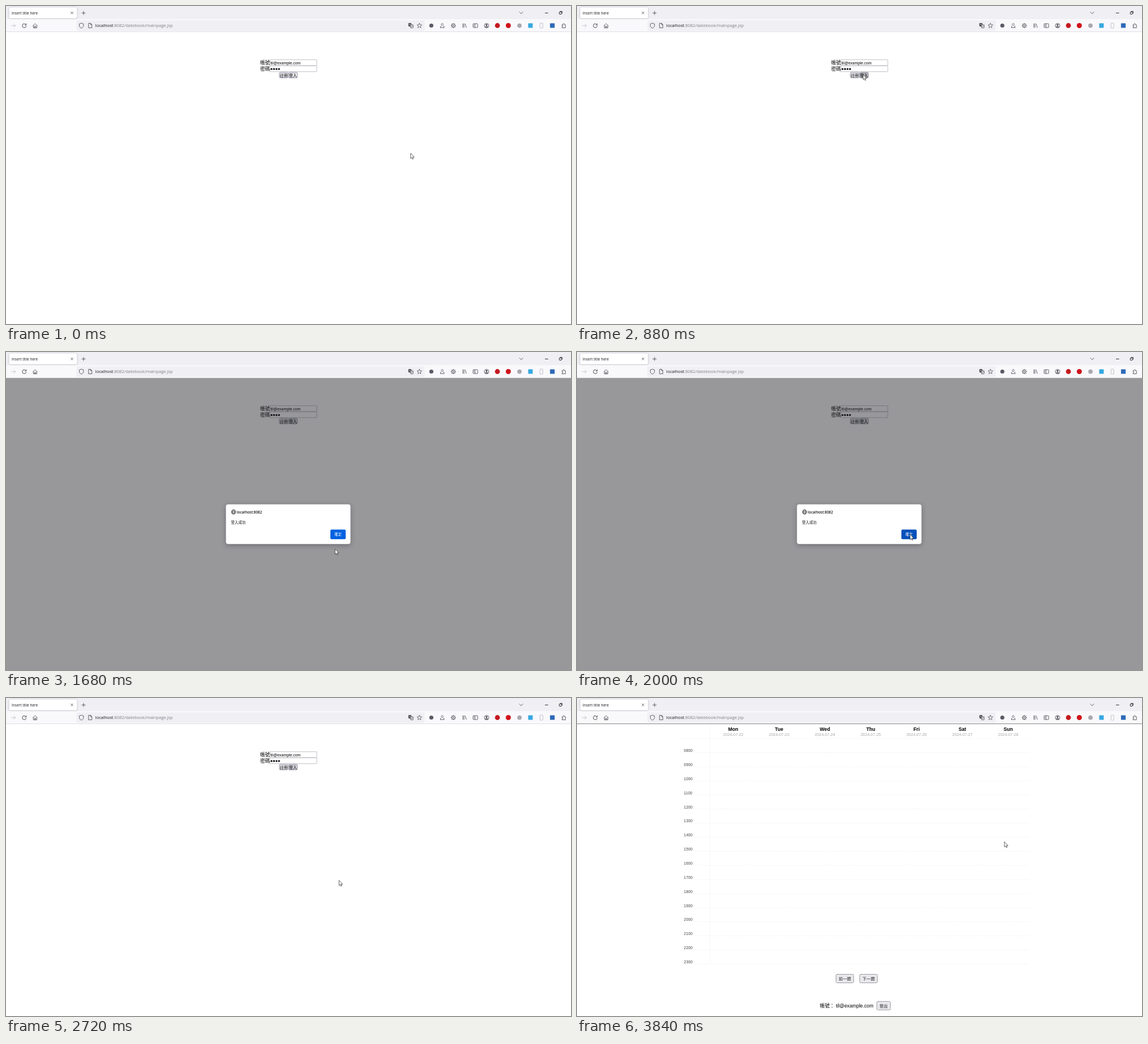
Write an HTML page with a canvas that moves like this. It is 998 px wide and 561 px high and loops after 3.92 s.

```html
<!DOCTYPE html>
<html lang="zh-Hant">
<head>
<meta charset="utf-8">
<title>Datebook</title>
<style>
html, body { margin: 0; width: 100%; height: 100%; overflow: hidden; background: #fff; }
canvas { display: block; }
</style>
</head>
<body>
<canvas id="stage" width="998" height="561"></canvas>
<script>
const ctx = document.getElementById('stage').getContext('2d');
const LOOP = 3920, STEP = 80;
const UI = '"Open Sans", "Noto Sans CJK TC", "Noto Sans CJK", sans-serif';
const ARIAL = '"Liberation Sans", "Noto Sans CJK TC", "Noto Sans CJK", sans-serif';
const CJK = '"Noto Sans CJK TC", "Noto Sans CJK", sans-serif';
const EMAIL = 'til@example.com';
const INK = '#3c3c44';

// Pointer track: time, x, y
const TRACK = [
  [80, 714.8, 259.8], [640, 505.6, 123.5], [720, 505.6, 123.5], [880, 505.3, 120.7],
  [1040, 505.3, 120.7], [1520, 470, 103], [1680, 581.3, 347.6],
  [2000, 588.3, 321.7], [3600, 588.3, 321.7], [3840, 754.9, 253.5]
];

function text(str, x, y, size, { font = ARIAL, color = '#000', align = 'left', weight = 400 } = {}) {
  ctx.font = `${weight} ${size}px ${font}`;
  ctx.fillStyle = color;
  ctx.textAlign = align;
  ctx.fillText(str, x, y);
}

function rect(x, y, w, h, fill) {
  ctx.fillStyle = fill;
  ctx.fillRect(x, y, w, h);
}

function box(x, y, w, h, r, fill, stroke, width = 0.7, dash = []) {
  ctx.beginPath();
  ctx.roundRect(x, y, w, h, r);
  if (fill) { ctx.fillStyle = fill; ctx.fill(); }
  if (stroke) outline(stroke, width, dash);
}

function outline(color, width = 0.8, dash = []) {
  ctx.strokeStyle = color;
  ctx.lineWidth = width;
  ctx.setLineDash(dash);
  ctx.stroke();
  ctx.setLineDash([]);
}

function line(points, color = INK, width = 0.8, dash = []) {
  ctx.beginPath();
  for (let i = 0; i < points.length; i += 2) ctx.lineTo(points[i], points[i + 1]);
  outline(color, width, dash);
}

function circle(x, y, r, fill, stroke, width = 0.8) {
  ctx.beginPath();
  ctx.arc(x, y, r, 0, Math.PI * 2);
  if (fill) { ctx.fillStyle = fill; ctx.fill(); }
  if (stroke) outline(stroke, width);
}

function shadow(color, blur, dy) {
  ctx.shadowColor = color;
  ctx.shadowBlur = blur;
  ctx.shadowOffsetY = dy;
}

function shape(d, x, y, color = INK, width = 0.8) {
  ctx.save();
  ctx.translate(x, y);
  ctx.strokeStyle = color;
  ctx.lineWidth = width;
  ctx.stroke(new Path2D(d));
  ctx.restore();
}

function star(x, y) {
  const pts = [];
  for (let i = 0; i <= 10; i++) {
    const a = -Math.PI / 2 + i * Math.PI / 5, r = i % 2 ? 2 : 4.5;
    pts.push(x + r * Math.cos(a), y + r * Math.sin(a));
  }
  line(pts, INK, 0.7);
}

function gear(x, y) {
  circle(x, y, 3.1, null, INK);
  circle(x, y, 1.2, null, INK, 0.7);
  for (let i = 0; i < 8; i++) {
    const c = Math.cos(i * Math.PI / 4), s = Math.sin(i * Math.PI / 4);
    line([x + 3 * c, y + 3 * s, x + 4.4 * c, y + 4.4 * s], INK, 1);
  }
}

function tabStrip() {
  rect(0, 0, 998, 23.5, '#f0f0f4');
  ctx.save();
  shadow('rgba(60,60,80,.45)', 2.5, 0.3);
  box(5.5, 2.3, 120, 19.4, 2.2, '#fff');
  ctx.restore();
  text('Insert title here', 10, 14.7, 6.5, { font: UI, color: '#15141a' });
  line([114.4, 10, 118.6, 14.2], INK, 0.8);
  line([118.6, 10, 114.4, 14.2], INK, 0.8);
  line([133.5, 12.3, 140.5, 12.3]);
  line([137, 8.8, 137, 15.8]);
  line([906.6, 10.3, 910, 13.6, 913.4, 10.3]);
  line([952, 12.3, 957.6, 12.3], '#15141a', 0.9);
  box(977.3, 10.5, 3.9, 3.9, 0.6, null, '#15141a', 0.9);
  line([978.6, 9.4, 982.4, 9.4, 982.4, 13.2], '#15141a', 0.8);
}

function navIcons() {
  shape('M-4 0H3.8M.8-3L3.8 0L.8 3', 13, 34.7, '#b9b9bf');
  ctx.beginPath();
  ctx.arc(32.3, 34.8, 3.5, 0.1, 5.4);
  outline(INK, 0.9);
  line([35.8, 30.8, 35.8, 33.5, 33, 33.5], INK, 0.9);
  shape('M-4 .2L0-3.6L4 .2M-3-.6V3.9H3V-.6M-.9 3.9V1H.9V3.9', 51.4, 34.7);
  shape('M0-4.3L3.7-3V0C3.7 2.2 1.8 3.8 0 4.5C-1.8 3.8-3.7 2.2-3.7 0V-3Z', 133.2, 34.6);
  shape('M-2.9-4H.8L2.9-1.8V4H-2.9ZM.6-4V-1.6H2.9', 148.7, 34.5);
}

function toolIcons() {
  box(710.8, 30.3, 5.2, 5.6, 0.6, INK);
  box(714.6, 33, 4.6, 5.6, 0.6, '#f0f0f4', INK, 0.8);
  line([712, 34.6, 713.4, 31.7, 714.8, 34.6], '#fff', 0.6);
  line([715.8, 35, 718.2, 35], INK, 0.6);
  line([715.8, 37.4, 717.8, 35], INK, 0.6);
  star(730.3, 34.7);
  circle(751.3, 34.5, 3.6, '#5b5b66');
  shape('M0-4L2.1-2L0 .2L-2.1-2ZM-3.6 3.7H3.6M-3.4 3.7L-2.4 .4M3.4 3.7L2.4 .4', 770.6, 34.4);
  gear(790.2, 34.6);
  line([807, 30.8, 807, 38.3]);
  line([809, 30.8, 809, 38.3]);
  line([811, 31.2, 813.2, 38.2]);
  box(825, 31.2, 8.2, 6.8, 1, null, INK, 0.8);
  line([828.3, 31.2, 828.3, 38]);
  line([826, 33.3, 827.4, 33.3], INK, 0.6);
  line([826, 35.2, 827.4, 35.2], INK, 0.6);
  circle(848.9, 34.6, 4, null, INK);
  circle(848.9, 33.3, 1.5, INK);
  shape('M-2.4 2.2Q0-.4 2.4 2.2Z', 848.9, 34.8, INK, 1);
  circle(868, 34.5, 4.4, '#c41a20');
  circle(887.3, 34.5, 4.5, '#d0141c');
  circle(907, 34.6, 3.9, '#a9a9b0');
  box(922.4, 30.5, 8, 8, 0.3, '#36a7df');
  box(943.2, 30.1, 5, 9, 0.9, null, '#b3b3bd', 0.8);
  box(960.9, 30.4, 8.2, 8.2, 0.5, '#2f6ab8');
  shape('M-3-1.7H-1.1C-1.7-4.5 1.7-4.5 1.1-1.7H3V3.8H-3V2C-.7 2.5-.7-.5-3 .1Z', 985.2, 34.7);
}

function chrome(edge) {
  tabStrip();
  rect(0, 23.5, 998, 22, '#f9f9fb');
  rect(0, 45, 998, 1, edge);
  box(124.5, 25.4, 615, 18.4, 2.2, '#f0f0f4');
  navIcons();
  const host = 'localhost';
  text(host, 157.8, 37.2, 7.55, { font: UI, color: '#15141a' });
  const w = ctx.measureText(host).width;
  text(':8082/datebook/mainpage.jsp', 157.8 + w, 37.2, 7.55, { font: UI, color: '#7f7f87' });
  toolIcons();
}

function loginPage(fill) {
  text('帳號', 449, 103.3, 8.6, { font: CJK });
  text('密碼', 449, 114.2, 8.6, { font: CJK });
  box(466.2, 94.8, 82.8, 10.2, 0.8, '#fff', '#a5a5b0', 0.7);
  box(466.2, 105.6, 82.8, 10.2, 0.8, '#fff', '#a5a5b0', 0.7);
  text(EMAIL, 467.2, 102.6, 6.93);
  for (let i = 0; i < 4; i++) circle(469 + i * 4.4, 111.2, 1.6, '#000');
  box(482.9, 117, 15.2, 9.9, 1.8, '#e9e9ed', '#85859a', 0.8);
  box(499.2, 117, 15.4, 9.9, 1.8, fill, '#85859a', 0.8);
  text('註冊', 490.5, 124.6, 6.9, { font: CJK, align: 'center' });
  text('登入', 506.9, 124.6, 6.9, { font: CJK, align: 'center' });
}

function dialog(fill) {
  rect(0, 45.4, 998, 516, 'rgba(28,27,34,.45)');
  ctx.save();
  shadow('rgba(28,27,34,.35)', 9, 2);
  box(388.5, 268.8, 220, 70, 4, '#fff');
  ctx.restore();
  circle(402, 282.2, 3.8, null, '#15141a', 0.8);
  ctx.beginPath();
  ctx.ellipse(402, 282.2, 1.7, 3.8, 0, 0, Math.PI * 2);
  outline('#15141a', 0.7);
  line([398.2, 282.2, 405.8, 282.2], '#15141a', 0.7);
  text('localhost:8082', 407.8, 284.6, 6.4, { font: UI, color: '#15141a', weight: 600 });
  text('登入成功', 397.6, 302.6, 6.4, { font: CJK, color: '#15141a' });
  box(573, 313.3, 27, 17, 2, fill);
  text('確定', 586.6, 324.2, 6.5, { font: CJK, color: '#fff', align: 'center', weight: 500 });
}

function dashedButton(label, x, y, w) {
  box(x, y, w, 15, 2, '#e9e9ed', '#33333a', 0.8, [1.6, 1.2]);
  text(label, x + w / 2, y + 10.2, 7.3, { font: CJK, color: '#222', align: 'center' });
}

function calendar() {
  const days = ['Mon', 'Tue', 'Wed', 'Thu', 'Fri', 'Sat', 'Sun'];
  days.forEach((day, i) => {
    const x = 276 + i * 80.95;
    text(day, x, 57.7, 8.7, { align: 'center', weight: 700 });
    text('2024-07-' + (22 + i), x, 67.2, 7, { align: 'center', color: '#a6a6a6' });
  });
  for (let i = 0; i <= 16; i++) {
    const y = 71.6 + i * 24.85;
    line([184, y, 800, y], '#ededed', 0.7, [2, 1.4]);
    if (i) text(String(i + 7).padStart(2, '0') + '00', 188.8, y - 1.3, 6.9, { color: '#444' });
  }
  line([235, 46, 235, 469], '#ededed', 0.7, [2, 1.4]);
  dashedButton('前一週', 457.5, 487.5, 31.2);
  dashedButton('下一週', 499.4, 487.5, 31.2);
  text('帳號：', 429, 546.3, 8.65, { font: CJK });
  text(EMAIL, 457.3, 546, 8.65);
  dashedButton('登出', 529.6, 535.3, 24);
}

function pointerAt(t) {
  const last = TRACK[TRACK.length - 1];
  if (t <= TRACK[0][0]) return TRACK[0].slice(1);
  if (t >= last[0]) return last.slice(1);
  const i = TRACK.findIndex(k => k[0] > t);
  const [t0, x0, y0] = TRACK[i - 1], [t1, x1, y1] = TRACK[i];
  const u = (t - t0) / (t1 - t0), e = u * u * (3 - 2 * u);
  return [x0 + (x1 - x0) * e, y0 + (y1 - y0) * e];
}

function pointer([x, y]) {
  ctx.save();
  ctx.translate(x, y);
  const p = new Path2D('M0 0V9.2L2.1 7.3L3.4 10.4L4.9 9.8L3.6 6.8H6.4Z');
  ctx.fillStyle = '#fff';
  ctx.strokeStyle = '#222';
  ctx.lineWidth = 0.7;
  ctx.lineJoin = 'round';
  ctx.fill(p);
  ctx.stroke(p);
  ctx.restore();
}

function draw(t) {
  const inCalendar = t >= 2800;
  rect(0, 0, 998, 561, '#fff');
  if (inCalendar) {
    calendar();
  } else {
    const held = t >= 720 && t < 1120;
    loginPage(held ? '#b1b1b9' : t >= 640 ? '#d0d0d7' : '#e9e9ed');
    if (t >= 1040 && t < 2720) {
      dialog(t >= 2480 ? '#053e94' : t >= 1840 ? '#0250bb' : '#0061e0');
    }
  }
  chrome(inCalendar ? '#85858a' : '#dfdfe4');
  pointer(pointerAt(t));
}

const start = performance.now();
function tick() {
  const t = (performance.now() - start) % LOOP;
  draw(Math.floor(t / STEP) * STEP);
  requestAnimationFrame(tick);
}
tick();
</script>
</body>
</html>
```
